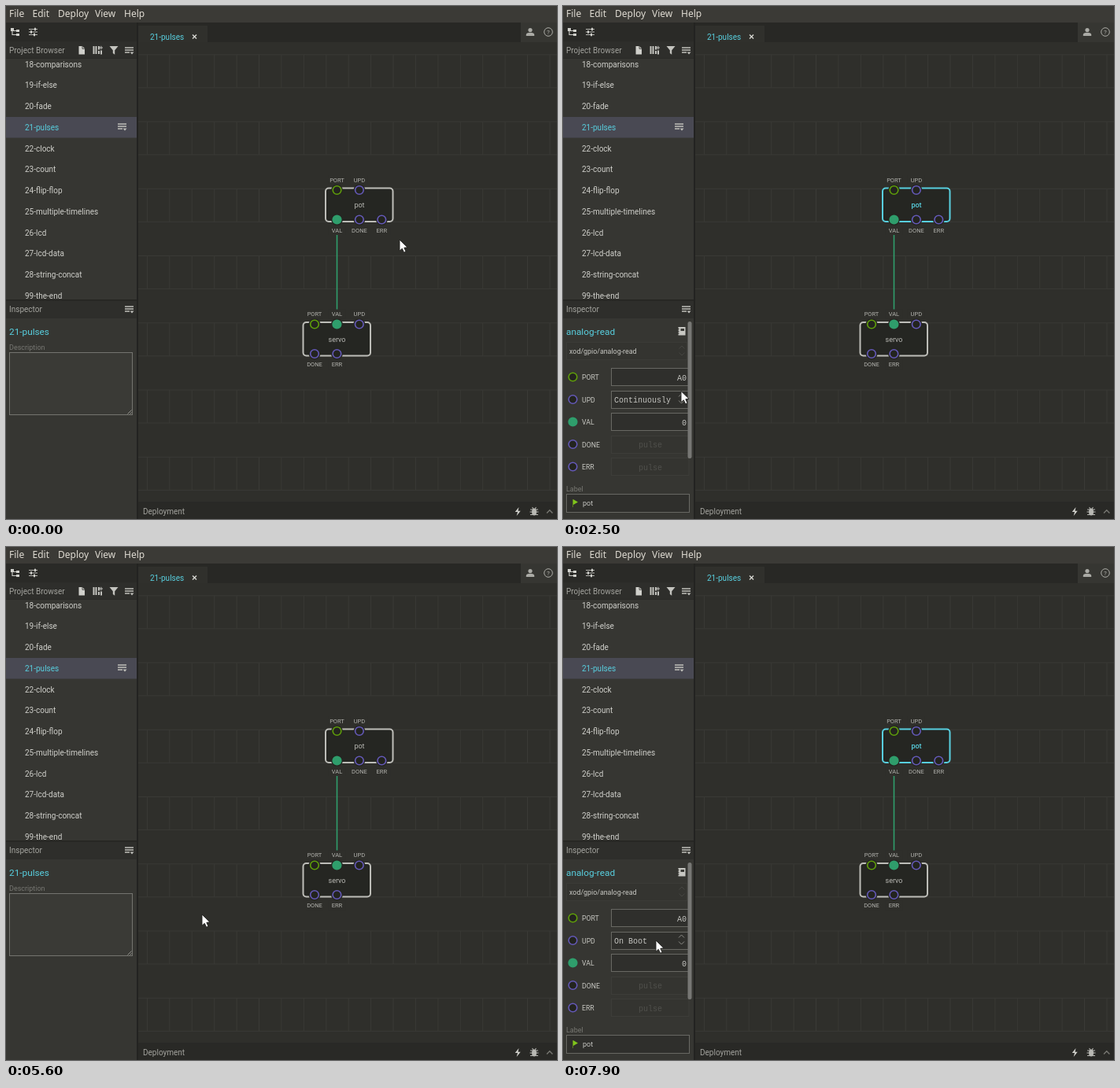
Recreate the animation shown at these times as an HTML page. Size 700 px wide and 652 px high, loop 8 s.

```html
<!DOCTYPE html>
<html lang="en">
<head>
<meta charset="utf-8">
<title>Patch editor</title>
<style>
  html, body { margin: 0; width: 100%; height: 100%; overflow: hidden; background: #2f2f2b; }
  svg { display: block; width: 700px; height: 652px; }
  text { font-family: Roboto, sans-serif; white-space: pre; }
  .mono { font-family: "Liberation Mono", monospace; }
  .menu { font-family: "Noto Sans", sans-serif; }
</style>
</head>
<body>
<svg id="stage" viewBox="0 0 700 652" xmlns="http://www.w3.org/2000/svg"></svg>
<script>
const CYAN = '#58cfdf', GREEN = '#5f9e0a', PURPLE = '#6459b8', JADE = '#2f9e6c';
const CHALK = '#c4c4c0', DIM = '#a3a39e', NODE = '#252622', CANVAS = '#2f2f2b', SIDE = '#363632';

const rect = (x, y, w, h, fill, extra = '') =>
  `<rect x="${x}" y="${y}" width="${w}" height="${h}" fill="${fill}" ${extra}/>`;
const path = (d, stroke, width = 1, fill = 'none') =>
  `<path d="${d}" stroke="${stroke}" stroke-width="${width}" fill="${fill}"/>`;
const shape = (d, fill) => `<path d="${d}" fill="${fill}"/>`;
// y is the visual middle of the line
const text = (x, y, s, size, fill, extra = '') =>
  `<text x="${x}" y="${y + size * 0.35}" font-size="${size}" fill="${fill}" ${extra}>${s}</text>`;
const mono = (x, y, s, fill = CHALK, extra = '') => text(x, y, s, 10, fill, 'class="mono" ' + extra);
const box = (x, y, w, h, stroke, fill = 'none') =>
  rect(x + 0.5, y + 0.5, w, h, fill, `stroke="${stroke}"`);
const group = (id, body, extra = '') => `<g id="${id}" ${extra}>${body}</g>`;
const pin = (x, y, color, filled) =>
  `<circle cx="${x}" cy="${y}" r="5.3" fill="${filled ? color : '#23241f'}" stroke="${color}" stroke-width="1.6"/>`;
const menuIcon = (x, y) => path(`M${x - 5} ${y - 4}h11M${x - 5} ${y - 1}h11M${x - 5} ${y + 2}h6`, '#c0c0bb', 1.3) +
  shape(`M${x + 1.5} ${y + 1.5}h5l-2.5 3z`, '#c0c0bb');
const chevrons = (x, y, color) =>
  path(`M${x - 3.5} ${y - 3}l3.5 -3.5l3.5 3.5M${x - 3.5} ${y + 2}l3.5 3.5l3.5 -3.5`, color);

function grid() {
  let d = '';
  for (let row = 0; row < 7; row++) {
    const top = 61.8 + row * 85.25;
    d += `M168 ${top}H700M168 ${top + 42}H700`;
    for (let x = 179.4; x < 700; x += 28.42) d += `M${x.toFixed(1)} ${top}v42`;
  }
  return path(d, '#3a3a36', 1);
}

// pins: [column, label, colour, filled]
function node(id, x, y, label, inputs, outputs) {
  const px = col => x + 14.5 + col * 28.4;
  const draw = (pins, py, ly) => pins.map(([col, name, color, filled]) =>
    `<circle cx="${px(col)}" cy="${py}" r="7.4" fill="${NODE}"/>` + pin(px(col), py, color, filled) +
    rect(px(col) - 11, ly - 6, 22, 12, CANVAS) +
    text(px(col), ly, name, 7.5, '#b2b2ad', 'text-anchor="middle"')).join('');
  return rect(x, y, 85.5, 42.5, NODE, `id="${id}Box" rx="4" stroke="#bdbdb8" stroke-width="2"`) +
    text(x + 43, y + 21.5, label, 9, '#b8b8b3', `id="${id}Label" text-anchor="middle"`) +
    draw(inputs, y + 2.5, y - 10.5) + draw(outputs, y + 40, y + 53.5);
}

function menuBar() {
  const items = [['File', 4], ['Edit', 33.5], ['Deploy', 66], ['View', 113], ['Help', 150]];
  return rect(0, 0, 700, 21, '#3b3a36') +
    items.map(([s, x]) => text(x, 10, s, 12, '#dfdbd2', 'class="menu"')).join('');
}

function sidebar() {
  const names = ['18-comparisons', '19-if-else', '20-fade', '21-pulses', '22-clock', '23-count', '24-flip-flop',
    '25-multiple-timelines', '26-lcd', '27-lcd-data', '28-string-concat', '99-the-end'];
  const list = names.map((s, i) => text(24, 74 + i * 26.75, s, 10, i === 3 ? CYAN : '#cfcfca')).join('');
  return rect(0, 21, 168, 631, SIDE) + rect(0, 141, 166, 26.5, '#494953') +
    `<svg x="0" y="0" width="166" height="373.5">${list}</svg>` + menuIcon(147, 154) +
    rect(0, 21, 168, 46, '#2a2a27') + rect(0, 45, 166, 21, '#2e2e2b') +
    // tree and sliders
    shape('M6 28h4v4h-4zM13 30h4v3h-4zM13 35h4v3h-4z', '#d0d0cb') + path('M8 31v5.5h5M8 31.5h5', '#d0d0cb', 1.1) +
    path('M29 29.5h11M29 33h11M29 36.5h11', '#b8b8b3', 1.1) + path('M37 27.8v3.4M32 31.3v3.4M36 34.8v3.4', '#d0d0cb', 2) +
    text(4, 56.5, 'Project Browser', 10, DIM) +
    // new file, library, filter
    shape('M92.500 51h4.500l3 3v7.500h-7.500z', '#d0d0cb') + path('M97 51v3.300h3', '#2e2e2b', 0.8) +
    path('M111.500 51v10M114.500 51v10M118 51v4.500M118 57v4M121 56.500v5', '#c4c4bf', 2) +
    path('M118.500 53h4.500M120.800 50.800v4.500', '#c4c4bf', 1) +
    shape('M131.500 51h11l-4.300 5.300v5.500l-2.400 -1.800v-3.700z', '#c4c4bf') + menuIcon(156, 57) +
    rect(0, 374, 166, 23, '#2e2e2b') + rect(0, 373, 166, 1.5, '#252522') +
    text(4, 385.5, 'Inspector', 10, DIM) + menuIcon(156, 386) +
    rect(166, 21, 2, 631, '#232321');
}

function workspace() {
  return rect(168, 21, 532, 631, CANVAS) + grid() +
    path('M420.500 272V405', JADE, 1.6) +
    node('pot', 406, 231.5, 'pot', [[0, 'PORT', GREEN], [1, 'UPD', PURPLE]],
      [[0, 'VAL', JADE, 1], [1, 'DONE', PURPLE], [2, 'ERR', PURPLE]]) +
    node('servo', 377.5, 402, 'servo', [[0, 'PORT', GREEN], [1, 'VAL', JADE, 1], [2, 'UPD', PURPLE]],
      [[0, 'DONE', PURPLE], [1, 'ERR', PURPLE]]) +
    rect(168, 21, 532, 25, '#282825') + rect(168, 25, 88, 21, '#30302c') +
    text(183, 39, '21-pulses', 10, CYAN) + path('M237 36.500l5 5M242 36.500l-5 5', '#d8d8d3', 1.4) +
    rect(654, 21, 46, 25, '#363632') +
    '<circle cx="666" cy="30.500" r="2.600" fill="#aaaaa5"/>' + shape('M660.800 38v-1.500q0 -2.800 5.200 -2.800t5.200 2.800v1.500z', '#aaaaa5') +
    '<circle cx="689" cy="33" r="5.300" fill="none" stroke="#aaaaa5"/>' +
    text(689, 33, '?', 8, '#aaaaa5', 'text-anchor="middle"') +
    rect(168, 630, 532, 22, '#292926') + text(174, 642.5, 'Deployment', 10, DIM) +
    shape('M651.500 637l-4.800 6h3.300l-1.300 5l5 -6.300h-3.200z', '#d0d0cb') +
    '<ellipse cx="671" cy="643" rx="3" ry="4.500" fill="#b8b8b3"/>' +
    path('M666 640h10M665.500 643h11M666 646.500h10M668.500 637l1.500 2M673.500 637l-1.500 2', '#b8b8b3', 1.1) +
    path('M687 644.500l3.700 -3.700l3.700 3.700', '#777772', 1.4);
}

function patchPanel() {
  return text(4, 413.5, '21-pulses', 11.8, CYAN) + text(4, 433.5, 'Description', 9, '#777772') +
    box(4, 440, 156, 79, '#74746f', '#3a3a36') + path('M154.500 518.500l5 -5M157.500 518.500l2 -2', '#aaaaa5', 0.8);
}

function nodePanel() {
  const rows = [['PORT', GREEN], ['UPD', PURPLE], ['VAL', JADE, 1], ['DONE', PURPLE], ['ERR', PURPLE]];
  const body = rows.map(([name, color, filled], i) => {
    const y = 471.5 + i * 28.5, faint = i > 2;
    return pin(12.5, y, color, filled) + text(24, y + 0.5, name, 8.7, '#c8c8c3') +
      rect(61.5, Math.round(y - 11.5) + 0.5, 98.5, 22, faint ? '#343430' : '#2f2f2c',
        `stroke="${faint ? '#3d3d39' : '#686863'}"${i === 1 ? ' id="updBox"' : ''}`) +
      (faint ? mono(111, y + 0.5, 'pulse', '#50504c', 'text-anchor="middle"') : '');
  }).join('');
  return text(4, 413.5, 'analog-read', 11.8, CYAN) +
    rect(146.500, 408, 9, 10.500, '#c8c8c3') + path('M145.500 410.500h2M145.500 413.300h2M145.500 416h2', '#2a2a27', 1) +
    rect(149.500, 410, 4.500, 3, '#3a3a36') +
    box(4, 427, 153, 22, '#3b3b37', '#343430') + text(8, 438.5, 'xod/gpio/analog-read', 8.9, '#c8c8c3') +
    chevrons(151, 438.5, '#454541') + body +
    mono(157, 472, 'A0', CHALK, 'text-anchor="end"') + mono(157, 529, '0', CHALK, 'text-anchor="end"') +
    mono(65, 500.5, '', CHALK, 'id="updValue"') + chevrons(150.5, 499.5, '#8c8c87') +
    text(4, 614, 'Label', 9, '#777772') + box(4, 620, 156, 23, '#686863', '#2f2f2c') +
    path('M12.500 627v10', '#5a7a20', 1) + shape('M13 627l6 3.500l-6 3.500z', '#7fc51c') + text(25, 632, 'pot', 9, CHALK) +
    rect(158.5, 401, 5, 174, '#777774', 'id="thumb" rx="2.5"');
}

const options = ['Never', 'On Boot', 'Continuously'];
const dropdown = box(61, 512, 98.5, 43, '#a8985c', '#2b2b28') +
  rect(62, 513, 97.5, 14, '#1e90ff', 'id="choice"') +
  options.map((s, i) => mono(65, 520 + i * 14.2, s, '#dcdcd7')).join('');

const tooltip = rect(0, 0, 111, 37, '#242422', 'rx="2" opacity="0.94"') +
  text(8, 11.5, 'pot', 10, '#e2e2dd', 'font-weight="700"') + text(8, 24.5, 'xod/gpio/analog-read', 10, '#b5b5b0');

const stage = document.getElementById('stage');
stage.innerHTML = workspace() + menuBar() + sidebar() +
  group('patchPanel', patchPanel()) + group('nodePanel', nodePanel()) + group('dropdown', dropdown) +
  group('tooltip', tooltip) +
  group('arrow', path('M0 0V14.200L3.300 11.300L5.600 16.200L8 15.200L5.800 10.300L10 9.800Z', '#20201e', 0.9, '#fff')) +
  group('beam', path('M-3 -6q3 0 3 1.500q0 -1.500 3 -1.500M0 -5v10M-3 6q3 0 3 -1.500q0 1.500 3 1.500', '#f2f2f2', 1.3));

const el = {};
stage.querySelectorAll('[id]').forEach(e => el[e.id] = e);
const show = (e, on) => e.setAttribute('display', on ? 'inline' : 'none');
const place = (e, x, y) => e.setAttribute('transform', `translate(${x} ${y})`);

// pointer stops: time, x, y
const stops = [
  [0, 500, 297], [100, 500, 297], [700, 472, 241], [1500, 472, 241], [1700, 388, 238], [1800, 348, 247],
  [1900, 348, 247], [2200, 232, 445], [2300, 232, 445], [2500, 150, 489.5], [2800, 144, 493], [3500, 144, 493],
  [3700, 133, 516], [3800, 133, 516], [4000, 124, 525], [4100, 124, 525], [4200, 118, 528], [4800, 118, 528],
  [4900, 119, 528], [5000, 119, 528], [5300, 249, 467], [5900, 249, 467], [6500, 451, 258], [6700, 451, 258],
  [6800, 464, 247], [7200, 464, 247], [7900, 118, 500], [8000, 118, 500]
];

function pointer(t) {
  const i = stops.findIndex((s, k) => k && t <= s[0]);
  const [t0, x0, y0] = stops[i - 1], [t1, x1, y1] = stops[i];
  const p = (t - t0) / (t1 - t0), k = t1 - t0 > 400 ? p * p * (3 - 2 * p) : p;
  return [x0 + (x1 - x0) * k, y0 + (y1 - y0) * k];
}

function render(ms) {
  const t = Math.floor(ms / 100) * 100;
  const within = (a, b) => t >= a && t < b;
  const [x, y] = pointer(t);
  const selected = within(1100, 5500) || t >= 7200;
  const hover = x > 405 && x < 492 && y > 230 && y < 275;
  const color = selected ? CYAN : hover ? '#fff' : null;

  el.potBox.setAttribute('stroke', color || '#bdbdb8');
  el.potLabel.setAttribute('fill', color || '#b8b8b3');
  el.potLabel.setAttribute('font-weight', color ? 500 : 400);
  show(el.patchPanel, !selected);
  show(el.nodePanel, selected);

  const open = within(3000, 4600);
  show(el.dropdown, open);
  el.updBox.setAttribute('stroke', open ? CYAN : '#686863');
  el.updValue.textContent = options[t < 4600 ? 2 : 1];
  el.choice.setAttribute('y', 513 + 14.2 * (t < 3600 ? 2 : t < 4000 ? 0 : 1));
  const overPanel = within(2400, 5200) || t >= 7700;
  el.thumb.setAttribute('opacity', overPanel ? 1 : t === 5200 ? 0.5 : 0);

  show(el.tooltip, within(1000, 1200) || within(7100, 7300));
  if (t < 2000) place(el.tooltip, 477, 247);
  else place(el.tooltip, 462, 260);

  const beam = within(4600, 4900);
  show(el.beam, beam);
  show(el.arrow, !beam);
  place(el.arrow, x, y);
  place(el.beam, 121, 531);
}

function tick() {
  render(performance.now() % 8000);
  requestAnimationFrame(tick);
}
tick();
</script>
</body>
</html>
```
